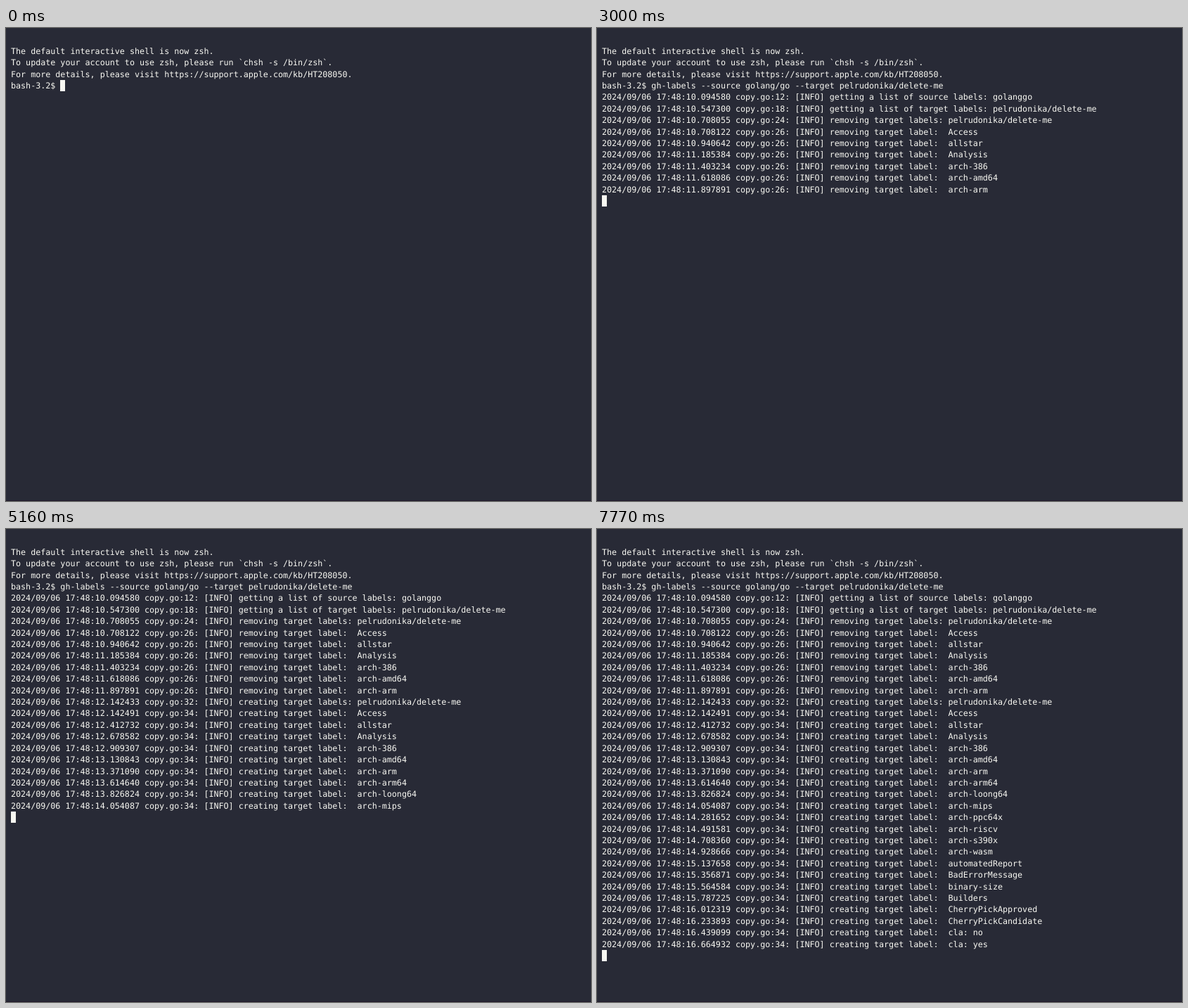
These frames come from a looping animation (832x673 px, 8000 ms). An HTML page:

```html
<!DOCTYPE html>
<html lang="en">
<head>
<meta charset="utf-8">
<title>Terminal</title>
<style>
  html, body { margin: 0; width: 100%; height: 100%; overflow: hidden; background: #282a36; }
  #term {
    position: absolute; left: 7px; top: 24.8px; margin: 0;
    font: 11.7px/16.4px "DejaVu Sans Mono", monospace;
    text-rendering: geometricPrecision; font-variant-ligatures: none;
    color: #f8f8f2; white-space: pre;
  }
  #cursor { position: absolute; width: 1ch; height: 16.4px; background: #f8f8f2; }
  #edge { position: absolute; left: 0; right: 0; top: 672px; height: 1px; background: #21192b; }
</style>
</head>
<body>
<div id="term"><span id="text"></span><div id="cursor"></div></div>
<div id="edge"></div>
<script>
const LOOP = 8000, ROW = 16.4;
const repo = 'pelrudonika/delete-me';
const intro = `The default interactive shell is now zsh.
To update your account to use zsh, please run \`chsh -s /bin/zsh\`.
For more details, please visit https://support.apple.com/kb/HT208050.
bash-3.2$ `;
const command = `gh-labels --source golang/go --target ${repo}`;

// seconds within 17:48, line of copy.go, message
const log = [
  ['10.094580', 12, 'getting a list of source labels: golanggo'],
  ['10.547300', 18, 'getting a list of target labels: ' + repo],
  ['10.708055', 24, 'removing target labels: ' + repo],
  ...labels(26, 'removing', `10.708122 Access
10.940642 allstar
11.185384 Analysis
11.403234 arch-386
11.618086 arch-amd64
11.897891 arch-arm`),
  ['12.142433', 32, 'creating target labels: ' + repo],
  ...labels(34, 'creating', `12.142491 Access
12.412732 allstar
12.678582 Analysis
12.909307 arch-386
13.130843 arch-amd64
13.371090 arch-arm
13.614640 arch-arm64
13.826824 arch-loong64
14.054087 arch-mips
14.281652 arch-ppc64x
14.491581 arch-riscv
14.708360 arch-s390x
14.928666 arch-wasm
15.137658 automatedReport
15.356871 BadErrorMessage
15.564584 binary-size
15.787225 Builders
16.012319 CherryPickApproved
16.233893 CherryPickCandidate
16.439099 cla: no
16.664932 cla: yes`)
];

function labels(line, verb, list) {
  return list.split('\n').map(item =>
    [item.slice(0, 9), line, `${verb} target label:  ${item.slice(10)}`]);
}

// Each log line appears when its timestamp says, in steps of 10 ms.
const events = [{ at: 0, text: intro }, { at: 500, text: command }];
log.forEach(([sec, line, message], i) => events.push({
  at: i ? Math.round(sec * 100 - 889.5) * 10 : 1190,
  text: `${i ? '' : '\n'}2024/09/06 17:48:${sec} copy.go:${line}: [INFO] ${message}\n`
}));

const textEl = document.getElementById('text');
const cursor = document.getElementById('cursor');
const start = performance.now();
let shown = 0;

function draw() {
  const t = Math.max(0, performance.now() - start) % LOOP;
  const visible = events.filter(e => e.at <= t);
  if (visible.length !== shown) {
    shown = visible.length;
    const text = visible.map(e => e.text).join('');
    const lines = text.split('\n');
    textEl.textContent = text;
    cursor.style.left = lines.at(-1).length + 'ch';
    cursor.style.top = (lines.length - 1) * ROW + 'px';
  }
  requestAnimationFrame(draw);
}
draw();
</script>
</body>
</html>
```
